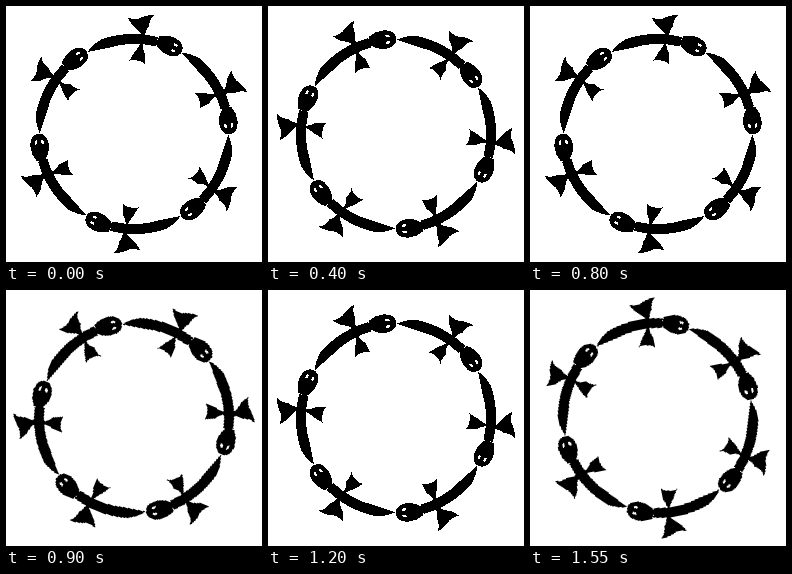
These frames come from a looping animation (256 px wide and 256 px high, 1.6 s). An HTML page:

```html
<!DOCTYPE html>
<html lang="en">
<head>
<meta charset="utf-8">
<title>Ring of winged snakes</title>
<style>
  html, body { margin: 0; width: 100%; height: 100%; overflow: hidden; background: #fff; }
  svg { display: block; width: 100vw; height: 100vh; shape-rendering: crispEdges; }
  .ring { animation: spin 1.6s steps(32) infinite; transform-origin: 0 0; }
  @keyframes spin { to { transform: rotate(360deg); } }
</style>
</head>
<body>
<svg viewBox="-128 -128 256 256">
  <defs>
    <g id="snake">
      <!-- body -->
      <path d="M-46.5 -82Q-41 -90 -32 -95A101 101 0 0 1 24 -97L22 -87.5A90 90 0 0 0 -25 -86.3Q-36 -84 -46.5 -82Z"/>
      <!-- outer wing -->
      <path d="M8.5 -96Q7 -102 1.5 -106Q-3 -109 -6 -116.5Q0 -114 5 -115.5Q11 -119 21 -119Q15 -115 15 -107.5Q11 -104 11 -96Z"/>
      <!-- inner wing -->
      <path d="M6.5 -92Q5 -86 1 -83Q-1 -79 -5 -73Q-1 -75 3 -73.5Q8 -73 11.5 -69Q9.5 -74 11.5 -80Q8 -84 8.5 -92Z"/>
      <g transform="translate(36.2 -88) rotate(25)">
        <path d="M-14 -4.5C-9 -8 -4 -9.3 1 -9.3C8 -9.3 13 -5.5 13 0S8 9.3 1 9.3C-4 9.3 -9 8 -14 4.5Z"/>
        <g fill="#fff">
          <ellipse cx="4.5" cy="-3.2" rx="2.4" ry="1.2" transform="rotate(10 4.5 -3.2)"/>
          <ellipse cx="4.5" cy="3.2" rx="2.4" ry="1.2" transform="rotate(-10 4.5 3.2)"/>
        </g>
      </g>
    </g>
  </defs>
  <g class="ring">
    <use href="#snake"/>
    <use href="#snake" transform="rotate(60)"/>
    <use href="#snake" transform="rotate(120)"/>
    <use href="#snake" transform="rotate(180)"/>
    <use href="#snake" transform="rotate(240)"/>
    <use href="#snake" transform="rotate(300)"/>
  </g>
</svg>
</body>
</html>
```
